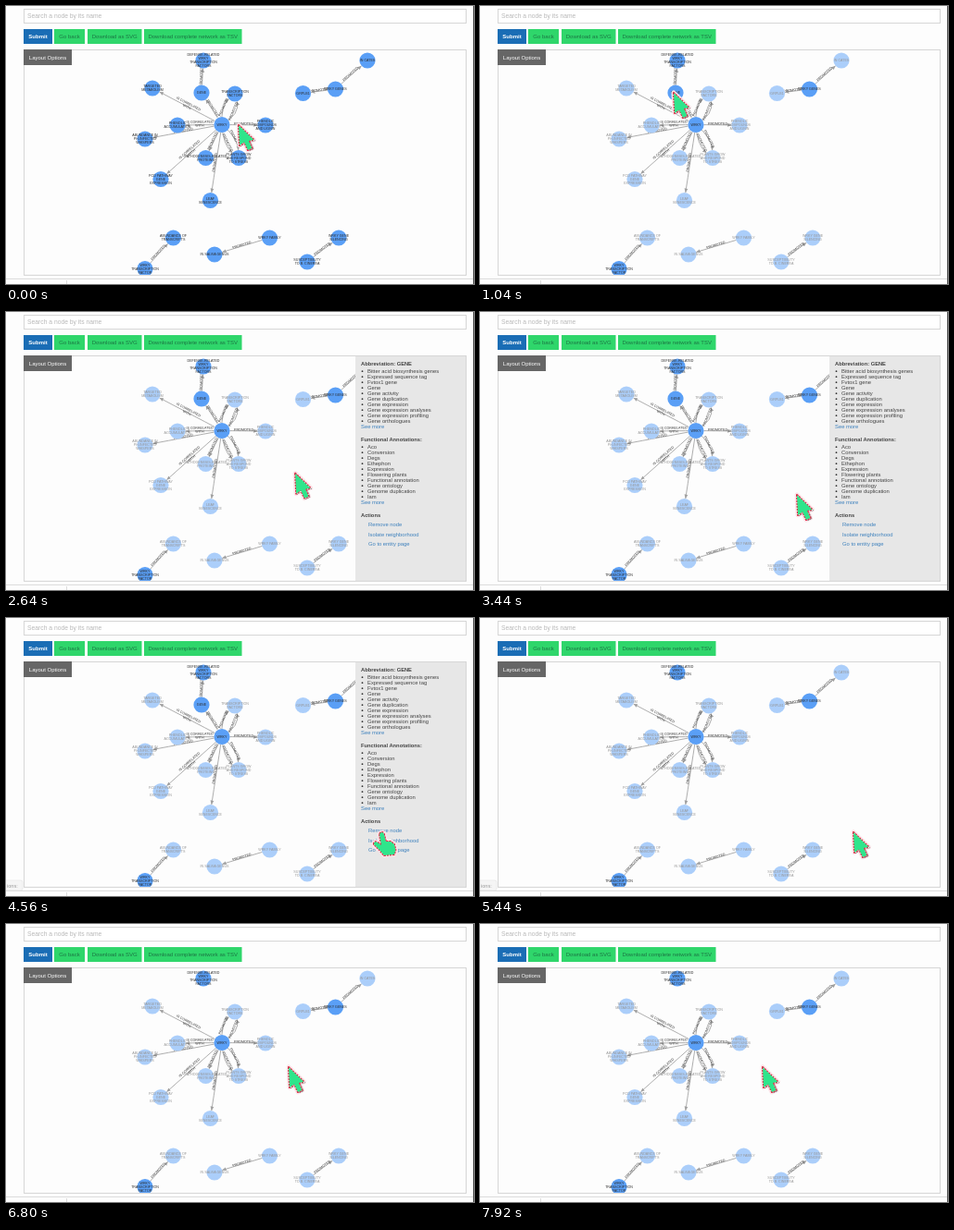
Recreate the animation shown at these times as an HTML page. Size 505x301 px, loop 8 s.

```html
<!DOCTYPE html>
<html lang="en">
<head>
<meta charset="utf-8">
<title>Network explorer</title>
<style>
html, body { margin: 0; width: 100%; height: 100%; overflow: hidden; background: #fdfdfd; }
svg { display: block; width: 505px; height: 301px; font-family: "Liberation Sans", Arial, sans-serif; }
.node text, .edge text { font-size: 3.65px; text-anchor: middle; fill: #2c2c2c; }
.edge path { fill: none; stroke: #9a9a9a; stroke-width: .8; }
.panel text { font-size: 5.83px; fill: #444; }
.panel .link { fill: #3d80bd; }
.panel .head { font-weight: bold; font-size: 5.75px; }
</style>
</head>
<body>
<svg id="stage" viewBox="0 0 505 301">
  <defs>
    <marker id="tip" markerUnits="userSpaceOnUse" markerWidth="5" markerHeight="5" refX="4.5" refY="2.5" orient="auto">
      <path d="M0,.6L4.5,2.5L0,4.4Z" fill="#a0a0a0"/>
    </marker>
    <clipPath id="box"><rect x="20" y="48" width="476" height="243"/></clipPath>
  </defs>
  <path d="M0 295.5H504M65.5 297V301" stroke="#dcdcdc" fill="none"/>
  <path d="M504.5 0V301" stroke="#555"/>
  <rect x="19.5" y="3.5" width="477" height="15" fill="#fff" stroke="#d6d6d6"/>
  <text x="23" y="13.3" font-size="6.75" fill="#b8b8b8">Search a node by its name</text>
  <g id="buttons"></g>
  <rect x="19.5" y="47.5" width="477" height="244" fill="#fdfdfd" stroke="#d6d6d6"/>
  <g id="graph" clip-path="url(#box)"></g>
  <rect x="19" y="47" width="52" height="17" fill="#666"/>
  <text x="45" y="57.8" font-size="6" fill="#fff" text-anchor="middle">Layout Options</text>
  <g id="panel" class="panel"><rect x="377" y="48" width="119" height="243" fill="#e7e7e7"/></g>
  <g id="status">
    <rect x="-3" y="284" width="21" height="11" rx="2" fill="#f5f5f5" stroke="#ddd" stroke-width=".5"/>
    <text x="1" y="291.5" font-size="5.6" fill="#999">ions:</text>
  </g>
  <g id="cursor" stroke-linejoin="round">
    <g id="arrow"></g>
    <g id="hand"></g>
  </g>
</svg>
<script>
const $ = id => document.getElementById(id);

function add(parent, tag, attrs, text) {
  const el = document.createElementNS("http://www.w3.org/2000/svg", tag);
  for (const k in attrs) el.setAttribute(k, attrs[k]);
  if (text) el.textContent = text;
  return parent.appendChild(el);
}

// Centred lines of text
function lines(parent, text, x, y, step) {
  const rows = text.split("/");
  rows.forEach((row, i) =>
    add(parent, "text", { x, y: y + 1.3 + (i - (rows.length - 1) / 2) * step }, row));
}

// Toolbar
for (const [x, w, label] of [[19, 31, "Submit"], [52, 33, "Go back"],
    [88, 58.5, "Download as SVG"], [149, 105.5, "Download complete network as TSV"]]) {
  const main = label === "Submit";
  add($("buttons"), "rect", { x, y: 25, width: w, height: 16, fill: main ? "#1a6db5" : "#2fd66b" });
  add($("buttons"), "text", { x: x + w / 2, y: 35.2, "font-size": 6, "text-anchor": "middle",
    "font-weight": main ? "bold" : "normal", fill: main ? "#fff" : "#1c7443" }, label);
}

// Graph: name -> x, y, label, stays bright after selection
const nodes = {
  def: [213, 59, "DEFENSE-RELATED/WRKY/TRANSCRIPTION/FACTORS", 1],
  gene: [211, 94, "GENE", 1],
  target: [158, 89, "TARGETED/METABOLISM"],
  tf: [247, 95, "TRANSCRIPTION/FACTORS"],
  acc: [185, 129, "PHENOLIC/ACCUMULATION"],
  wrky: [233, 128.5, "WRKY", 1],
  lignin: [280, 129, "PHENOLIC/COMPOUNDS/AND LIGNIN"],
  abund: [150, 144, "ABUNDANCE IN/PH-INFECTED/WHISPERS"],
  patho: [215.5, 164.5, "PATHOGENESIS-RELATED/PROTEINS"],
  plants: [251, 164.5, "PLANTS GROW/AND RESPOND/TO STRESS"],
  pcd: [167, 187.5, "PCD PATHWAY/GENE/EXPRESSION"],
  leaf: [220.5, 210.5, "LEAF/SENESCENCE"],
  trans: [180.5, 251, "ABUNDANCE OF/TRANSCRIPTS"],
  factor: [150, 284.5, "WRKY/TRANSCRIPTION/FACTOR", 1],
  genus: [225, 269, "IN SALVIA GENUS"],
  family: [284.5, 251, "WRKY FAMILY"],
  silence: [359, 251, "WRKY GENE/SILENCING"],
  suscept: [325, 277, "SUSCEPTIBILITY/TO B. CINEREA"],
  grp: [320.5, 94.5, "GRPLB1"],
  genes: [355.5, 90, "WRKY GENES", 1],
  cates: [390, 59, "IN CATES"]
};
const P = "PROMOTED", C = "IS CORRELATED/WITH";
const edges = [
  ["gene", "def", P], ["wrky", "gene", P], ["wrky", "target", C],
  ["wrky", "tf", P, -9], ["wrky", "tf", P, 14], ["wrky", "acc", C], ["wrky", "lignin", P],
  ["wrky", "abund", P], ["wrky", "patho", P], ["wrky", "plants", P, -9], ["wrky", "plants", P, 9],
  ["wrky", "pcd", C], ["wrky", "leaf", P], ["factor", "trans", P], ["family", "genus", P],
  ["suscept", "silence", P], ["genes", "grp", P], ["genes", "cates", P]
];
const faded = [], geneParts = [];

for (const [a, b, label, bend = 0] of edges) {
  const [x1, y1] = nodes[a], [x2, y2] = nodes[b];
  const dx = x2 - x1, dy = y2 - y1, len = Math.hypot(dx, dy);
  const cx = (x1 + x2) / 2 - dy / len * bend, cy = (y1 + y2) / 2 + dx / len * bend;
  const end = Math.hypot(x2 - cx, y2 - cy);
  const ex = x2 - (x2 - cx) / end * 8.5, ey = y2 - (y2 - cy) / end * 8.5;
  const g = add($("graph"), "g", { class: "edge" });
  add(g, "path", { d: `M${x1},${y1}Q${cx},${cy} ${ex},${ey}`, "marker-end": "url(#tip)" });
  const mx = (x1 + x2) / 4 + cx / 2, my = (y1 + y2) / 4 + cy / 2;
  let turn = Math.atan2(dy, dx) * 180 / Math.PI;
  if (turn > 90) turn -= 180;
  if (turn <= -90) turn += 180;
  lines(add(g, "g", { transform: `translate(${mx} ${my}) rotate(${turn})` }), label, 0, -1.5, 3.8);
  if (a === "gene" || b === "gene") geneParts.push(g);
}
for (const name in nodes) {
  const [x, y, label, bright] = nodes[name];
  const g = add($("graph"), "g", { class: "node" });
  add(g, "circle", { cx: x, cy: y, r: 8.6, fill: "#fff" });
  const face = add(g, "g", {});
  add(face, "circle", { cx: x, cy: y, r: 8.6, fill: "#5a9ff6" });
  lines(face, label, x, y, 4);
  if (!bright) faded.push(face);
  if (name === "gene") geneParts.push(g);
}

// Side panel
function row(x, y, text, cls = "") {
  add($("panel"), "text", { x, y: y + 2, class: cls }, text);
}
function list(y, title, items) {
  row(383, y, title, "head");
  items.split("/").forEach((item, i) => {
    const iy = y + 8.2 + i * 6;
    add($("panel"), "circle", { cx: 384.5, cy: iy, r: .9, fill: "#333" });
    row(390, iy, item);
  });
  row(383, y + 68.3, "See more", "link");
}
list(56, "Abbreviation: GENE", "Bitter acid biosynthesis genes/Expressed sequence tag/Fvtox1 gene/Gene/Gene activity/Gene duplication/Gene expression/Gene expression analyses/Gene expression profiling/Gene orthologues");
list(138, "Functional Annotations:", "Aco/Conversion/Degs/Ethephon/Expression/Flowering plants/Functional annotation/Gene ontology/Genome duplication/Iam");
row(383, 220, "Actions", "head");
["Remove node", "Isolate neighborhood", "Go to entity page"].forEach((s, i) => row(391, 230 + i * 10.6, s, "link"));

// Pointers, drawn from their tip: pale halo, dotted red rim, green face
function pointer(g, d, shadow) {
  add(g, "path", { d, fill: "#fff", stroke: "#fbe3e8", "stroke-width": 5 });
  if (shadow) add(g, "path", { d, fill: "#333", stroke: "#333", transform: "translate(1.2 .6)" });
  add(g, "path", { d, fill: "#2fe58b", stroke: "#fff", "stroke-width": 2.4 });
  add(g, "path", { d, fill: "none", stroke: "#e0203f", "stroke-width": 2, "stroke-dasharray": "2.2 .8" });
  add(g, "path", { d, fill: "#2fe58b" });
}
pointer($("arrow"), "M0,0L1,22L6,18.5L10,27L14.5,25L11,17L16.5,16Z", true);
pointer($("hand"), "M-1,2Q2,-2 4,2L6,10L11,10L15,13L16.5,19L15,24L4,25L-1,19L-7,13Q-7,9 -3,11L1,14Z", false);

// time, x, y of the pointer
const path = [[0, 251, 129], [80, 251, 129], [880, 209, 94], [1920, 209, 94], [2960, 342, 198],
  [3600, 342, 198], [4400, 404, 232], [5440, 403, 232], [6400, 305, 155], [8000, 305, 155]];

function pointerAt(t) {
  const i = path.findIndex(k => k[0] > t);
  const [t0, x0, y0] = path[i - 1], [t1, x1, y1] = path[i];
  const u = (t - t0) / (t1 - t0), e = u * u * (3 - 2 * u);
  return [x0 + (x1 - x0) * e, y0 + (y1 - y0) * e];
}

const show = (el, on) => el.setAttribute("visibility", on ? "visible" : "hidden");

function draw(now) {
  const t = now % 8000, within = (a, b) => t >= a && t < b;
  for (const el of faded) el.setAttribute("opacity", t >= 960 ? .5 : 1);
  for (const el of geneParts) show(el, t < 4960);
  show($("panel"), within(1120, 4960));
  show($("status"), within(4480, 5600));
  const hand = within(4320, 4960);
  show($("hand"), hand);
  show($("arrow"), !hand);
  $("cursor").setAttribute("transform", `translate(${pointerAt(t)})`);
  requestAnimationFrame(draw);
}
draw(performance.now());
</script>
</body>
</html>
```
